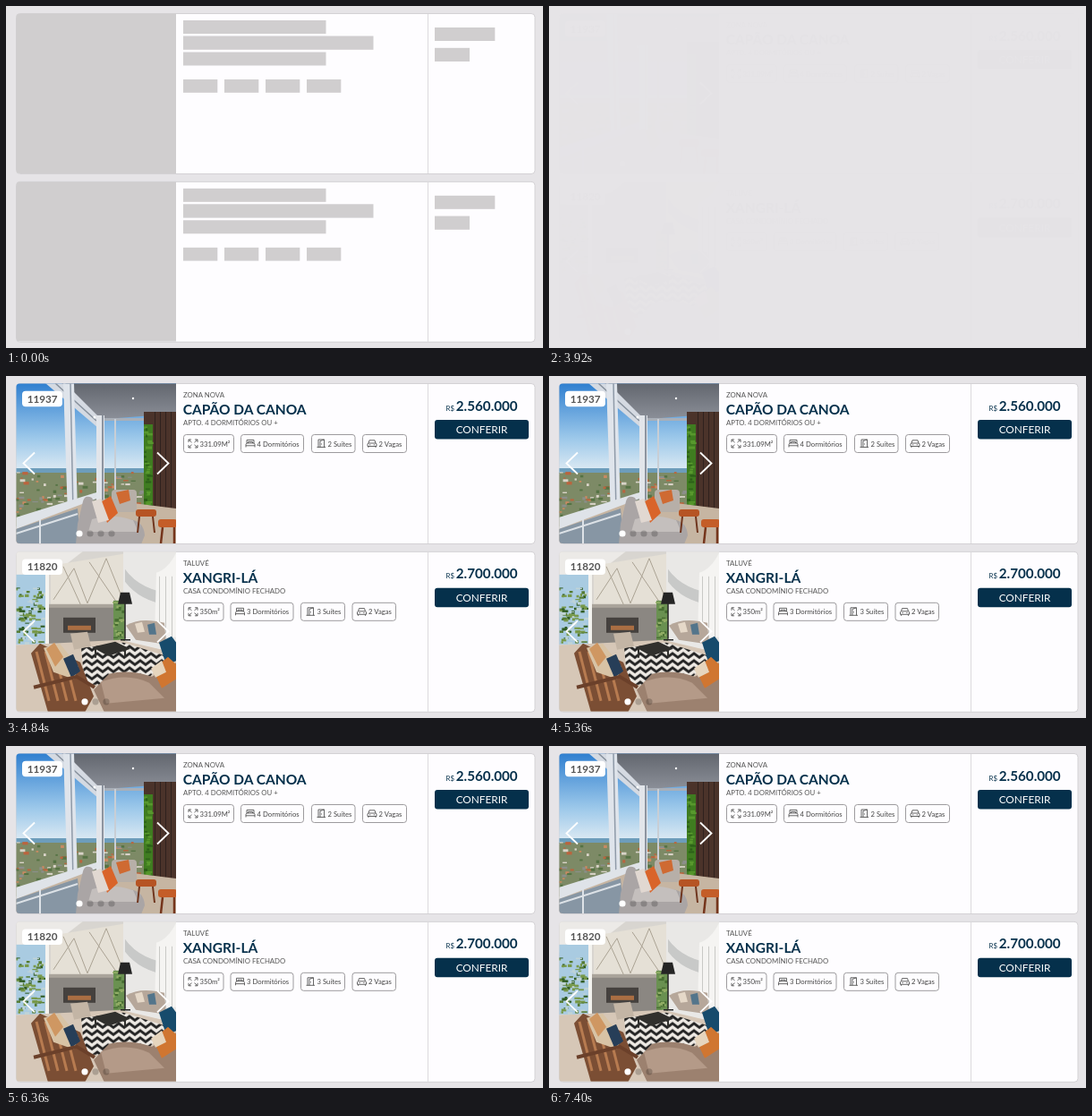
Animation of 600 by 382 pixels, one loop 7440 ms. Source, as an HTML page:

```html
<!DOCTYPE html>
<html lang="pt-BR">
<head>
<meta charset="utf-8">
<title>Listagem de imóveis</title>
<style>
  html, body { margin: 0; width: 100%; height: 100%; overflow: hidden; background: #e6e4e7; }
  svg { display: block; width: 100%; height: 100%; font-family: Lato, sans-serif; }
  .small { font-size: 7.8px; fill: #555; }
  .title { font-size: 15.5px; font-weight: 700; fill: #05304b; }
  .price { font-size: 15.2px; font-weight: 700; fill: #05304b; }
  .currency { font-size: 7.8px; fill: #05304b; }
  .button { font-size: 11.8px; fill: #fff; text-anchor: middle; }
  .badge { font-size: 11.7px; font-weight: 700; fill: #555; text-anchor: middle; }
  .chip { font-size: 7.7px; fill: #444; }
  .icon { fill: none; stroke: #555; stroke-width: .9; }
</style>
</head>
<body>
<svg id="stage" viewBox="0 0 600 382">
  <defs>
    <clipPath id="photoClip"><path d="M190 8.5H15Q11.5 8.5 11.5 12V183.5Q11.5 187 15 187H190Z"/></clipPath>
    <linearGradient id="sky" x2="0" y2="1">
      <stop stop-color="#2f7fd0"/><stop offset=".6" stop-color="#9cc8ea"/><stop offset="1" stop-color="#e4eef4"/>
    </linearGradient>
    <linearGradient id="ceiling" x2="0" y2="1">
      <stop stop-color="#62666e"/><stop offset="1" stop-color="#8b8f98"/>
    </linearGradient>
    <pattern id="zigzag" width="12" height="8" patternUnits="userSpaceOnUse">
      <rect width="12" height="8" fill="#eeeae4"/>
      <path d="M-2 8L6 2L14 8M-2 0L6 -6L14 0" fill="none" stroke="#222" stroke-width="3"/>
    </pattern>
  </defs>
  <g id="skeleton"></g>
  <g id="content"></g>
</svg>
<script>
const LOOP = 7440, REVEAL = 3920, FADE = 800, ROW = 187.8;

const rect = (x, y, w, h, fill, extra = '') =>
  `<rect x="${x}" y="${y}" width="${w}" height="${h}" fill="${fill}" ${extra}/>`;
const poly = (points, fill) => `<polygon points="${points}" fill="${fill}"/>`;
const line = (d, color, width) =>
  `<path d="${d}" fill="none" stroke="${color}" stroke-width="${width}"/>`;
const text = (cls, x, y, value) => `<text class="${cls}" x="${x}" y="${y}">${value}</text>`;
const dot = (x, y, r, fill) => `<circle cx="${x}" cy="${y}" r="${r}" fill="${fill}"/>`;

function randomizer(seed) {
  return () => (seed = seed * 16807 % 2147483647) / 2147483647;
}

// Small random patches: rooftops or leaves
function speckle(seed, count, x, y, w, h, colors) {
  const random = randomizer(seed);
  let out = '';
  for (let i = 0; i < count; i++) {
    out += rect((x + random() * w).toFixed(1), (y + random() * h).toFixed(1),
      (2 + random() * 5).toFixed(1), (1 + random() * 2.5).toFixed(1),
      colors[Math.floor(random() * colors.length)]);
  }
  return out;
}

const balcony = () =>
  rect(11, 8, 180, 102, 'url(#sky)') +
  rect(11, 103, 150, 6, '#6d9dbb') +
  rect(11, 108, 150, 60, '#7d8a66') +
  speckle(7, 130, 11, 107, 140, 48, ['#b9653f', '#d9d3c8', '#557344', '#c98a62', '#8c8f8b']) +
  poly('62,8 191,8 191,42 112,48 98,44', 'url(#ceiling)') +
  poly('44,8 66,8 103,45 103,58', '#d5dae2') +
  line('M55 8L101 50', '#87919d', 1.5) +
  poly('64,8 76,8 80,152 69,156', '#dfe4eb') +
  line('M72 8L75 152', '#8f9aa8', 1.5) +
  rect(101, 44, 9, 96, '#e2e5ea') + rect(107, 44, 2, 96, '#8d949f') +
  rect(110, 47, 46, 3, '#a9afb8') + rect(121, 48, 2, 84, '#c8ced5') +
  rect(154, 40, 37, 118, '#4b332a') +
  [166, 172, 178, 184].map(x => rect(x, 40, 1, 116, '#2f211d')).join('') +
  rect(154, 54, 10, 97, '#3f7c20') +
  speckle(23, 35, 154, 54, 5, 94, ['#58982d', '#2c6018']) +
  poly('11,160 80,143 110,138 191,148 191,188 11,188', '#c6b5a2') +
  poly('11,158 101,130 101,137 11,171', '#dfe3e8') +
  poly('11,171 80,148 84,188 11,188', '#8796a4') +
  line('M11 176L80 154M38 160V188', '#dde2e7', 2) +
  rect(118, 127, 28, 25, '#b7afa8', 'rx="4"') +
  `<path d="M86 140Q88 132 96 136L108 160H138Q154 162 155 178L151 188H78L80 165Z" fill="#aaa5a5"/>` +
  `<path d="M96 160Q118 153 142 161L148 174H92Z" fill="#c4bfbd"/>` +
  poly('106,141 117,134 125,153 113,164', '#d9642a') +
  poly('96,140 106,137 115,161 103,164', '#e1d8d1') +
  poly('123,130 137,127 139,139 127,143', '#cf6a32') +
  rect(145, 149, 23, 8, '#b65424', 'rx="3"') +
  line('M149 157L147 175M164 157L166 175', '#6f351e', 2) +
  rect(170, 160, 21, 9, '#c45d28', 'rx="3"') +
  line('M175 169L173 187M188 169V187', '#75351c', 2.5) +
  dot(99, 46, 1.5, '#fff') + dot(142, 25, 1.2, '#fff');

const lounge = () =>
  rect(11, 8, 180, 180, '#d8d5d0') +
  poly('11,8 86,8 55,32 11,43', '#eceae7') +
  rect(11, 34, 36, 78, '#a9cbe1') +
  speckle(11, 90, 11, 48, 30, 62, ['#557b32', '#78994a', '#315d25', '#bfd3d6']) +
  rect(44, 25, 4, 104, '#f4f3ef') +
  poly('50,24 131,11 131,70 50,72', '#e5e0d6') +
  line('M53 62L76 27L91 66L112 16L129 58M64 25L84 69M93 20L125 67', '#aaa293', 1) +
  poly('131,8 191,8 191,120 131,112', '#e9e8e6') +
  `<path d="M133 28Q150 52 189 56V69Q151 66 133 42Z" fill="#c8c9c8"/>` +
  `<path d="M168 32Q181 28 190 10V104H166Z" fill="#f5f4f2"/>` +
  [171, 178, 185].map(x => rect(x, 36, 1, 68, '#c9c9c6')).join('') +
  rect(48, 68, 76, 44, '#8b8782') + rect(48, 67, 76, 4, '#aaa49b') +
  rect(64, 82, 36, 17, '#45413e') + rect(69, 91, 26, 5, '#aa6e43') +
  rect(120, 63, 13, 47, '#6a9151') +
  speckle(31, 25, 119, 61, 11, 45, ['#466d31', '#91ad65']) +
  poly('11,113 128,107 191,122 191,188 11,188', '#d6c7b7') +
  poly('84,116 131,110 182,126 152,157 88,157', 'url(#zigzag)') +
  poly('128,54 138,54 141,67 125,67', '#252525') +
  line('M133 66V106M128 107H139', '#252525', 1.5) +
  `<path d="M134 91Q150 81 177 88L179 112L145 107Z" fill="#b6a79a"/>` +
  poly('144,89 152,87 155,98 147,99', '#e5d8c8') +
  poly('158,90 166,88 168,101 160,101', '#53758b') +
  poly('96,115 122,109 139,117 114,125', '#31302d') +
  line('M100 116V127M133 117V126', '#31302d', 2) +
  poly('72,100 91,98 95,114 76,118', '#c3b5a5') +
  `<path d="M28 122L38 111L83 132L98 170L88 188H47Z" fill="#7b4e34"/>` +
  [34, 44, 54, 64].map(x => line(`M${x} 120L${x + 14} 175`, '#b77b50', 3)).join('') +
  poly('42,116 60,111 81,137 76,151 53,143', '#d8c3a5') +
  poly('64,128 75,123 83,142 73,149', '#273e58') +
  poly('45,117 54,110 64,126 55,137', '#cf9762') +
  line('M31 160L79 148L99 160', '#6b402a', 4) +
  `<path d="M98 163L115 145Q137 139 163 148L191 132V188H110Z" fill="#9c816f"/>` +
  `<path d="M106 154Q135 143 160 155L177 172L112 178Z" fill="#b49a88"/>` +
  poly('171,110 185,103 191,111 191,130 179,135', '#174b6c') +
  poly('164,140 181,126 191,135 191,150 174,161', '#d07631') +
  poly('162,139 174,130 179,143 167,149', '#e6d5bd');

// Icons sit in a 12 by 10 box
const icons = {
  area: 'M1 4V1H4M8 1H11V4M11 7V10H8M4 10H1V7M1 1L4.5 4.2M11 1L7.5 4.2M1 10L4.5 6.8M11 10L7.5 6.8',
  bed: 'M2 5V1.5H10V5M1 9.5V6.5L2 5H10L11 6.5V9.5M1 7.8H11M3.5 5V3.5H8.5V5',
  door: 'M3 9.5V1H9.5V9.5M1.5 9.5H11M5 9.5V2.5L9.5 1M6.5 5.5V6.5',
  car: 'M2 5L3 1.8H9L10 5M1 8.5V5.8L2 5H10L11 5.8V8.5ZM2 8.5V10M10 8.5V10M3 6.8H4.2M7.8 6.8H9'
};

const chip = ([x, w, icon, label]) =>
  rect(x + .5, 65.5, w - 1, 20, '#fefdff', 'rx="3" stroke="#929093" stroke-width=".9"') +
  `<path class="icon" d="${icons[icon]}" transform="translate(${x + 5} 70)"/>` +
  text('chip', x + 18.6, 78.6, label);

const frame = () =>
  rect(11.5, 8.5, 579.5, 179, '#fefdff', 'rx="4" stroke="#d3d1d4"') +
  rect(471, 9, 1, 178, '#dcdadd');

const skeletonCard = () => {
  const bars = [
    [198, 16, 159.5, 15], [198, 33.5, 212.5, 15.3], [198, 51.5, 159.5, 15],
    ...[198, 244, 290, 336].map(x => [x, 82, 38.3, 14.8]),
    [479, 24, 67.3, 15], [479, 46.8, 39, 15.2]
  ];
  return frame() + rect(11, 8, 179.5, 180, '#d0cecf', 'clip-path="url(#photoClip)"') +
    bars.map(bar => rect(...bar, '#d0cecf')).join('');
};

const listingCard = ({ code, photo, slides, area, city, kind, price, chips }) => {
  const firstDot = 100 - (slides - 1) * 6;
  let dots = '';
  for (let i = 0; i < slides; i++) {
    dots += dot(firstDot + i * 12, 176, 3.6, i ? 'rgba(0,0,0,.2)' : '#fff');
  }
  return frame() + `<g clip-path="url(#photoClip)">${photo()}</g>` +
    rect(18, 16.8, 45, 17.4, '#fff', 'rx="4"') + text('badge', 40.7, 29.7, code) +
    line('M32 85.5L19.5 97.5L32 109.5M169 85.5L181.5 97.5L169 109.5', '#fff', 1.8) + dots +
    text('small', 198, 23.8, area) + text('title', 197.7, 43, city) + text('small', 198, 55.3, kind) +
    chips.map(chip).join('') +
    text('currency', 491.5, 38.5, 'R$') + text('price', 502.8, 38.6, price) +
    rect(479, 49, 105, 21.5, '#05304b', 'rx="3"') + text('button', 531.5, 64.2, 'CONFERIR');
};

const listings = [
  {
    code: '11937', photo: balcony, slides: 4, area: 'ZONA NOVA', city: 'CAPÃO DA CANOA',
    kind: 'APTO. 4 DORMITÓRIOS OU +', price: '2.560.000',
    chips: [[198, 57, 'area', '331.09M²'], [262, 71, 'bed', '4 Dormitórios'],
            [341, 49.5, 'door', '2 Suítes'], [398, 50, 'car', '2 Vagas']]
  },
  {
    code: '11820', photo: lounge, slides: 3, area: 'TALUVÉ', city: 'XANGRI-LÁ',
    kind: 'CASA CONDOMÍNIO FECHADO', price: '2.700.000',
    chips: [[198, 45.5, 'area', '350m²'], [250.5, 71, 'bed', '3 Dormitórios'],
            [329, 50, 'door', '3 Suítes'], [386.5, 49.5, 'car', '2 Vagas']]
  }
];

const skeleton = document.getElementById('skeleton');
const content = document.getElementById('content');
const stack = (items, render) => items.map((item, i) =>
  `<g transform="translate(0 ${i * ROW})">${render(item)}</g>`).join('');
skeleton.innerHTML = stack(listings, skeletonCard);
content.innerHTML = stack(listings, listingCard);

function draw(now) {
  const time = now % LOOP;
  const progress = Math.min(1, Math.max(0, (time - REVEAL) / FADE));
  skeleton.style.display = time < REVEAL ? '' : 'none';
  content.style.opacity = 1 - (1 - progress) ** 2;
  requestAnimationFrame(draw);
}
draw(performance.now());
</script>
</body>
</html>
```
